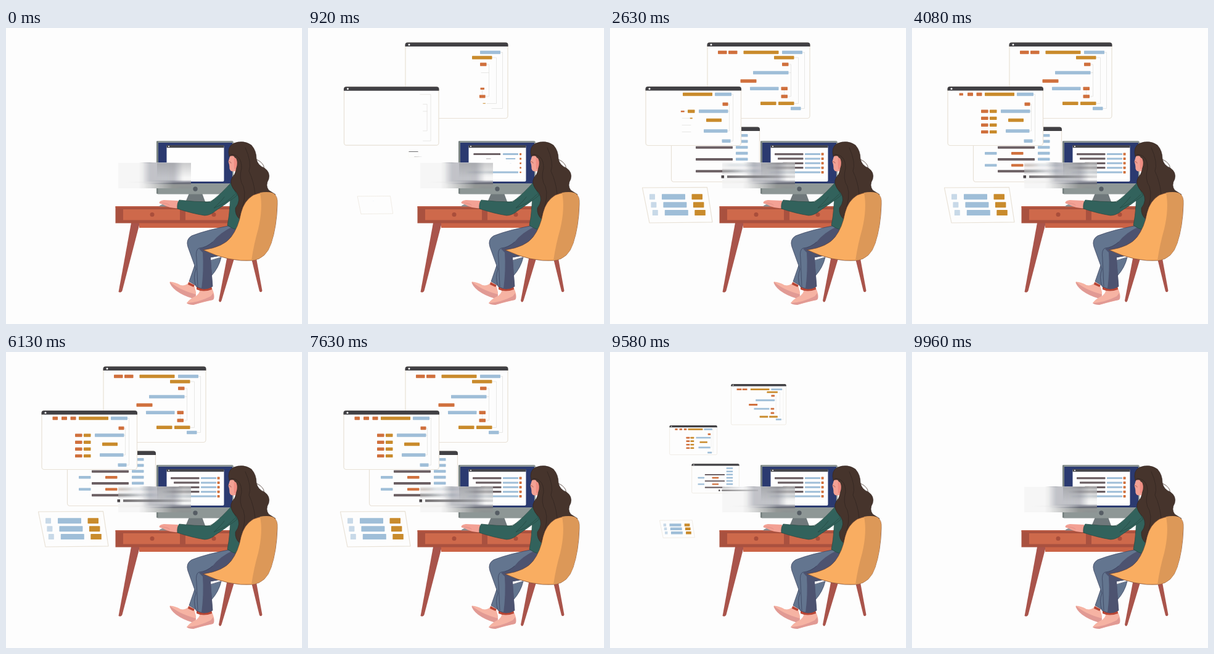
An HTML page with a canvas for the animation above (10 s loop, 480 by 480 pixels).

```html
<!DOCTYPE html>
<html lang="en">
<head>
<meta charset="utf-8">
<title>Working at the desk</title>
<style>
html, body { margin: 0; width: 100%; height: 100%; overflow: hidden; background: #fdfdfd; }
canvas { display: block; width: 480px; height: 480px; }
</style>
</head>
<body>
<canvas id="stage" width="480" height="480"></canvas>
<script>
const canvas = document.getElementById('stage');
const ctx = canvas.getContext('2d');
const snapshot = document.createElement('canvas');
snapshot.width = snapshot.height = 480;
const snapCtx = snapshot.getContext('2d');

const LOOP = 10000, GROW = 330;
const BLUE = '#9fbed8', GOLD = '#c98b2c', RUST = '#d0703d', DARK = '#6c6064', PALE = '#c8d9e8';
const TEAL = '#32625c', SKIN = '#f3a194', FOOT = '#f6b3a3', DENIM = '#63758f', SHADE = '#4d5370';
const HAIR = '#46342c', WOOD = '#a9513f', INK = '#343c58';

const smooth = p => { p = Math.min(1, Math.max(0, p)); return p * p * (3 - 2 * p); };
const grow = (t, start, span = GROW) => smooth((t - start) / span);

function shape(d, fill, stroke, width = 0.7) {
  const path = new Path2D(d);
  if (fill) { ctx.fillStyle = fill; ctx.fill(path); }
  if (stroke) {
    ctx.strokeStyle = stroke;
    ctx.lineWidth = width;
    ctx.lineCap = ctx.lineJoin = 'round';
    ctx.stroke(path);
  }
}
function rect(x, y, w, h, fill) { ctx.fillStyle = fill; ctx.fillRect(x, y, w, h); }
function round(x, y, w, h, r, fill, stroke, width = 1.2) {
  ctx.beginPath();
  ctx.roundRect(x, y, w, h, r);
  if (fill) { ctx.fillStyle = fill; ctx.fill(); }
  if (stroke) { ctx.strokeStyle = stroke; ctx.lineWidth = width; ctx.stroke(); }
}
function dot(x, y, r, fill) {
  ctx.beginPath();
  ctx.arc(x, y, r, 0, Math.PI * 2);
  ctx.fillStyle = fill;
  ctx.fill();
}
function fade(x0, y0, x1, y1, ...colors) {
  const g = ctx.createLinearGradient(x0, y0, x1, y1);
  colors.forEach((c, i) => g.addColorStop(i / (colors.length - 1), c));
  return g;
}
// Bar with its vertical middle at y, growing from its centre.
function bar(x, y, w, h, color, s) {
  if (s <= 0) return;
  round(x + w * (1 - s) / 2, y - h * s / 2, w * s, h * s, 0.7 * s, color);
}
function scaled(cx, cy, s, draw) {
  if (s <= 0.002) return;
  ctx.save();
  ctx.translate(cx, cy);
  ctx.scale(s, s);
  ctx.translate(-cx, -cy);
  draw();
  ctx.restore();
}
function panel(x, y, w, h) {
  round(x, y, w, h, 4, '#fdfdfd', '#e8e1d6');
  round(x - 0.5, y, w + 1, 6.4, [4, 4, 0, 0], '#414044');
  dot(x + 6, y + 3.4, 1.5, '#fff');
}
const links = d => shape(d, null, '#dfdedc', 0.7);

// Each row: x, middle y, width, colour, start time.
const backBars = [
  [279, 39.5, 33, BLUE, 400], [266, 48, 32.5, GOLD, 480], [279, 59, 10.5, RUST, 540],
  [277.5, 111, 10.5, RUST, 650], [277.5, 98.3, 10.5, RUST, 730], [273, 122.2, 25.5, GOLD, 835],
  [293, 130.5, 16.5, BLUE, 920], [232, 72.5, 57.5, BLUE, 980], [227, 98.3, 46.5, BLUE, 1060],
  [244, 122.2, 25.5, GOLD, 1150], [211.5, 86, 26, RUST, 1300], [216.5, 39.5, 57, GOLD, 1500],
  [192, 39.5, 14.5, RUST, 1750], [175, 39.5, 14.5, RUST, 1950]
];
const frontBars = [
  [170, 107.5, 27, BLUE, 1050], [182.5, 123.5, 9, RUST, 1180], [181.5, 183.3, 14, BLUE, 1280],
  [118, 107.5, 48, GOLD, 1380], [144, 135, 47.5, BLUE, 1500], [152, 167, 38.5, BLUE, 1620],
  [156, 149.5, 25, GOLD, 1780],
  [104.5, 107.5, 9, RUST, 3400], [90, 107.5, 9, RUST, 3640], [75.5, 107.5, 8.5, RUST, 3860]
];
const drawBars = (bars, t) => bars.forEach(([x, y, w, color, at]) => bar(x, y, w, 5.4, color, grow(t, at)));

function backPanel(t) {
  panel(158, 23.5, 166, 123);
  links('M312 39.5H315.5V130.5H298 M298 48H305.5V122.5H290 M289 59H293.5V111H283 M281 72.5H293.5 M282.5 98V111');
  drawBars(backBars, t);
}
function frontPanel(t) {
  panel(58, 95, 154.5, 95.5);
  links('M182 107.5H199.5V183.3H187 M187 123.5H193.5V167H187 M187 135H193.5');
  if (t > 2250) links('M117 135H131 M117 146.3H131 M117 157.5H131 M117 168.5H131');
  drawBars(frontBars, t);
  for (let i = 0; i < 4; i++) {
    const y = 135.2 + i * 11.1, at = 2250 + i * 250;
    bar(126, y, 11.5, 5.2, GOLD, grow(t, at));
    bar(112, y, 11.5, 5.2, RUST, grow(t, at + 215));
  }
}
function listPanel(t) {
  panel(99.5, 160.5, 143, 89);
  for (let i = 0; i < 7; i++) bar(204, 174.3 + i * 9.6, 19.5, 4.6, BLUE, grow(t, 1250 + i * 110));
  for (let i = 0; i < 3; i++) bar(139, 193.8 + i * 19.2, 60, 4, DARK, grow(t, 1400 + i * 200));
  for (let i = 0; i < 2; i++) {
    bar(118, 203.2 + i * 19.4, 19.5, 4.4, BLUE, grow(t, 2600 + i * 350));
    bar(161, 203.2 + i * 19.4, 19.5, 4.4, RUST, grow(t, 2780 + i * 350));
  }
}
function tiltedCard(t) {
  shape('M52.5 259L157.5 258.3L166 314.8L64 316Z', '#fdfdfd', '#e8e1d6', 1.2);
  for (let i = 0; i < 3; i++) {
    const y = 273.8 + i * 12.9, shift = i * 2.4, at = 900 + i * 160;
    bar(64 + shift, y, 9, 9, PALE, grow(t, at - 30));
    bar(84 + shift, y, 38, 9, BLUE, grow(t, at - 20));
    bar(132.5 + shift, y, 17.5, 9, GOLD, grow(t, at + 80));
  }
}

function drawMonitor(t) {
  shape('M297 268H318L325 287H289Z', '#6f787b');
  round(244, 183, 125, 86.5, 3, '#8e9796');
  rect(244, 183.5, 2.6, 85, '#76807f');
  rect(247, 186, 120, 66, '#2b3a70');
  round(260.5, 190, 93, 59, 2, '#fefefe');
  rect(260.5, 190, 93, 4.2, '#46474c');
  dot(264, 192, 1.1, '#fff');
  dot(307, 261, 3.7, '#565d64');
  const darkX = [267, 272, 280, 279], darkAt = [640, 830, 960, 1060], blueAt = [600, 730, 860, 960, 590];
  for (let i = 0; i < 5; i++) {
    const y = 204.6 + i * 7.35, blueX = i < 4 ? 316 : 280;
    if (i < 4) bar(darkX[i], y, 313.5 - darkX[i], 3.2, DARK, grow(t, darkAt[i]));
    bar(blueX, y, 341 - blueX, 3, BLUE, grow(t, blueAt[i]));
    bar(342.6, y, 4, 4, RUST, grow(t, 690 + i * 10));
  }
}

function drawDesk() {
  shape('M203 316H217L188.5 426Q187 430 182.5 428Z', '#a9544b');
  rect(216, 316, 152, 8, '#cb6346');
  rect(177.5, 289.5, 190, 27, WOOD);
  rect(190, 294, 92, 17.5, '#ce694b');
  rect(291, 294, 76, 17.5, '#ce694b');
  rect(177.5, 289, 190, 2.2, '#b95842');
  dot(237, 302.5, 3.5, '#a94e3b');
  dot(337, 302.5, 3.5, '#a94e3b');
  shape('M248 289.5Q251 284.5 261 286L266 289.5Z', '#8b9094');
}

function drawWoman() {
  // Feet
  shape('M297 412L305 417L308 428Q309 439 301 438Q287 430 276 424Q263 414 266 411.5Q275 412 283 417Q292 419 297 412Z', FOOT);
  shape('M266 411.5Q279 424 308 432Q308 439 301 438Q287 434 276 426Q265 417 266 411.5Z', '#e19a94');
  shape('M314 423L333 420Q341 436 335 441Q322 444 307 448Q296 449 293 446Q298 439 309 434Q315 429 314 423Z', FOOT);
  shape('M293 446Q313 445 332 435L336 430Q339 440 335 441Q322 443 304 449Q296 449 293 446Z', '#e19a94');
  shape('M296 412L306 417L304 420L295 416Z M309 420L333 417L334 424Q320 429 309 424Z', '#b84635');
  // Legs
  shape('M349 372Q345 389 333 402L309 418L297 411L306 385Z', DENIM, INK);
  shape('M371 319Q326 327 301 337Q291 343 295 355L308 391Q303 404 308 419Q322 427 335 419L331 372L372 365L384 326Z', DENIM, INK);
  shape('M370 321Q346 332 335 347Q325 355 313 358L319 364Q321 392 317 423Q327 424 335 419L332 372L376 364L384 330Z', SHADE);
  shape('M335 347Q325 356 313 357Q307 359 309 374L311 419', null, INK);
  // Torso, face and arm
  shape('M366 248L392 247L394 320L378 328Q367 326 359 320Q362 306 363 288Z', TEAL, '#24483f');
  shape('M365 203Q362 211 360.5 217Q362.5 221 362.5 228Q364 234 371 232L376 239L382 208Z', SKIN);
  shape('M361 217Q364 216 365 219', null, '#87433c');
  shape('M279 280L256 279Q248 280 248.5 284Q255 286 260 289Q269 293 279 292Z', SKIN);
  shape('M250 284Q259 283 265 287', null, '#d88982');
  shape('M365 251Q350 268 332 282Q305 282 281 279Q277 284 278 293Q302 301 322 304Q331 304 339 297Q356 286 374 272Z', TEAL, '#24483f');
  shape('M371 270Q358 284 337 292Q349 281 354 274 M323 283Q332 282 337 278', null, '#24483f');
  // Hair
  shape('M362 208Q358 193 369 187Q385 181 398 190Q406 199 406 212Q408 223 419 227Q429 234 426 245Q420 255 426 263L437 270L428 282L390 290Q389 302 379 310Q371 303 372 292Q382 279 374 267Q360 253 367 242Q375 234 374 217Q375 211 371 210Q370 205 362 208Z', HAIR, '#30231f', 0.6);
  shape('M369.5 211Q376 211 374.5 223Q373 229 370 229Z', '#ef8d82');
  shape('M364 205Q382 205 382 227Q377 245 385 257Q391 273 379 305 M388 194Q399 218 394 232Q402 249 404 269', null, '#302420');
  shape('M406 213Q415 217 418 224Q419 228 417 230', null, '#4c3a33', 0.8);
}

function drawChair() {
  shape('M358 374H370L349.5 442Q347 447 345 442Z M398 374H406L415.5 426Q414 430 411 427Z', '#a9544b');
  shape('M320 360Q353 355 365 339Q377 323 381 300Q386 280 401 271Q418 264 433 268Q441 272 440 286Q439 322 430 349Q422 374 400 377Q362 380 320 360Z', '#f9ad61', '#70412f');
  shape('M412 267Q428 264 435 269Q441 274 439.5 286Q439 322 430 349Q422 374 398 377Q402 350 409 326Q417 292 412 267Z', '#dc9858');
}

// Strip smeared sideways in front of the screen and the list.
function drawHaze(listScale) {
  const x = 182, y = 218.5, w = 118, h = 41.5, reach = 26;
  snapCtx.drawImage(canvas, 0, 0);
  ctx.save();
  ctx.beginPath();
  ctx.rect(x, y, w, h);
  ctx.clip();
  ctx.filter = 'blur(1.5px) saturate(0.4)';
  for (let i = 0; i <= reach; i++) {
    ctx.globalAlpha = 1 / (i + 1);
    ctx.drawImage(snapshot, 140, 205, 220, 70, 140 + 2 * i - reach, 205, 220, 70);
  }
  ctx.filter = 'none';
  ctx.globalAlpha = 1;
  rect(x, y, w, h, 'rgba(150,150,150,0.08)');
  rect(245, y, 55, 24, fade(0, y, 0, y + 24, 'rgba(120,122,126,0.35)', 'rgba(120,122,126,0)'));
  const shine = fade(193, 0, 300, 0, 'rgba(225,225,225,0)', 'rgba(225,225,225,0.5)', 'rgba(225,225,225,0.2)');
  rect(193, 249, 107, 2, shine);
  ctx.restore();
  scaled(171, 205, listScale, () => {
    rect(180.5, 239, 4.5, 4.5, '#4b4649');
    rect(190, 239.2, 110, 4, fade(190, 0, 300, 0, 'rgba(70,65,68,0.75)', 'rgba(85,85,88,0.5)', 'rgba(110,110,115,0.2)'));
  });
}

function render(t) {
  const size = (start, leave, span) => grow(t, start, 400) * (1 - grow(t, leave, span));
  const listScale = size(840, 9210, 780);
  rect(0, 0, 480, 480, '#fdfdfd');
  scaled(241, 85, size(40, 9210, 780), () => backPanel(t));
  scaled(171, 205, listScale, () => listPanel(t));
  scaled(135, 143, size(540, 9210, 740), () => frontPanel(t));
  scaled(109, 287, size(720, 9210, 740), () => tiltedCard(t));
  drawMonitor(t);
  drawDesk();
  drawHaze(listScale);
  drawWoman();
  drawChair();
}

const began = performance.now();
function tick() {
  render((performance.now() - began) % LOOP);
  requestAnimationFrame(tick);
}
tick();
</script>
</body>
</html>
```
